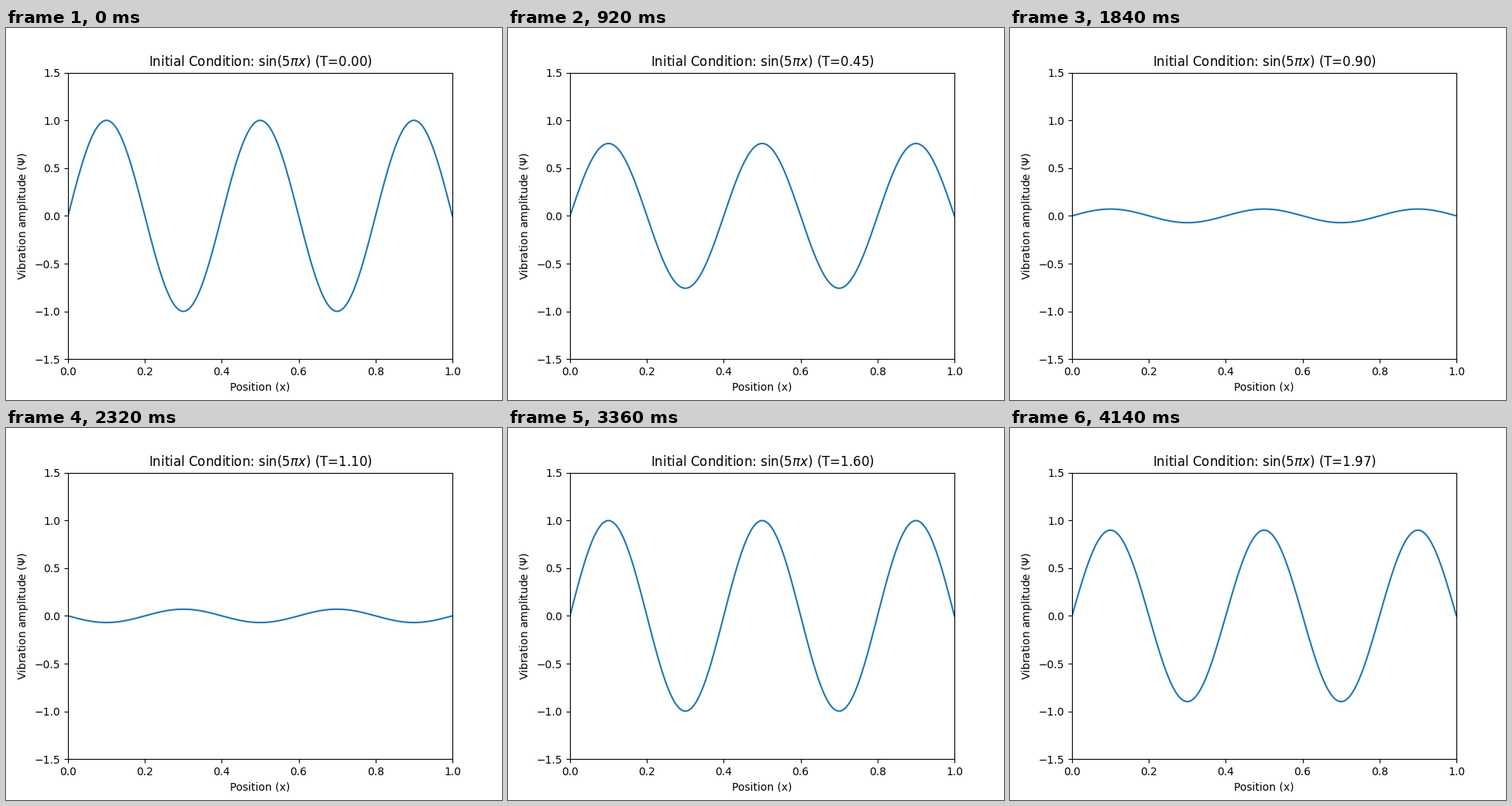
Recreate the animation shown at these times as a matplotlib script. Size 640 by 480 pixels, loop 4.16 s.

```python
import matplotlib.pyplot as plt
import numpy as np
from matplotlib.animation import FuncAnimation

TICK = 20                        # ms per animation frame
STEPS = 80                       # distinct poses in one loop
HOLD = [1, 5, 1, 5, 1]           # ticks each pose stays, repeating
STRIDE = 5                       # time samples between poses
MODE = 5 * np.pi

times = np.linspace(0, 10, 2000)
x = np.linspace(0, 1, 501)
shape = np.sin(MODE * x)
poses = np.repeat(np.arange(STEPS), np.tile(HOLD, STEPS // len(HOLD)))

fig, ax = plt.subplots(figsize=(6.4, 4.8), dpi=100)
line, = ax.plot(x, shape)
ax.set_xlim(0, 1)
ax.set_ylim(-1.5, 1.5)
ax.set_xlabel("Position (x)")
ax.set_ylabel(r"Vibration amplitude ($\Psi$)")
title = ax.set_title("")


def update(i):
    t = times[max(STRIDE * poses[i] - 1, 0)]
    line.set_ydata(shape * np.cos(MODE * t))
    title.set_text(rf"Initial Condition: $\sin(5\pi x)$ (T={t:.2f})")
    return line, title


anim = FuncAnimation(fig, update, frames=len(poses), interval=TICK, repeat=True)
plt.show()
```
